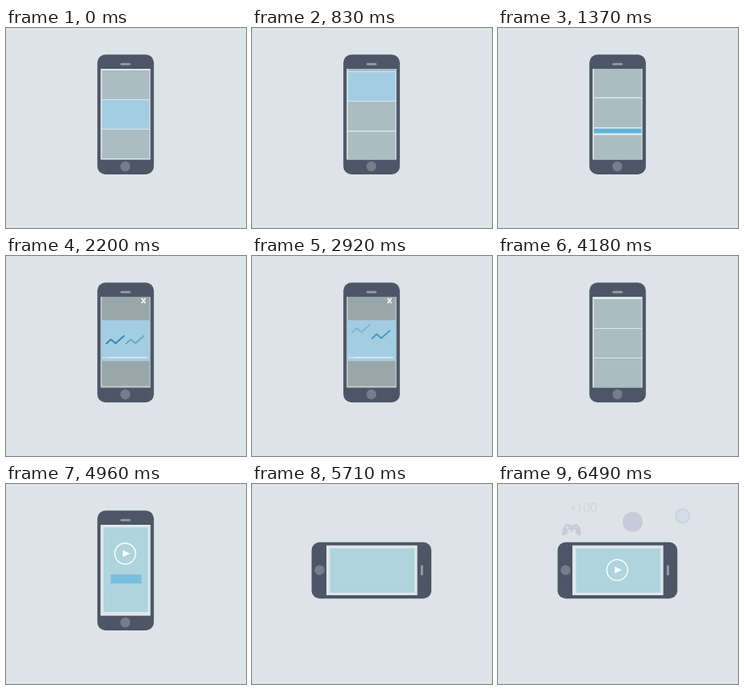
An HTML page with a canvas that plays this animation: 300 by 250 pixels, repeating every 8 s.

```html
<!DOCTYPE html>
<html lang="en">
<head>
<meta charset="utf-8">
<title>Phone formats</title>
<style>
html, body { margin: 0; width: 100%; height: 100%; overflow: hidden; background: #dce4e8; }
canvas { display: block; width: 300px; height: 250px; }
</style>
</head>
<body>
<canvas id="stage" width="300" height="250"></canvas>
<script>
const LOOP = 8000;
const ctx = document.getElementById('stage').getContext('2d');
const C = {
  bg: '#dce4e8', body: '#4d5666', knob: '#777d8a', speaker: '#979ca6',
  screen: '#dfe7ea', row: '#abbcc2', blue: '#a5cde2', strip: '#62b3d2',
  chart: '#2c8bb5', dim: 'rgba(90,90,85,.22)', ad: '#aed4dd',
  button: '#7abfde', icon: '#c5cbd8'
};
const SCREEN = { x: 118.3, y: 51, w: 62.2, h: 113.5 };
const MID = { x: 149.5, y: 108 };

const lerp = (a, b, k) => a + (b - a) * k;
const span = (t, a, b) => Math.min(1, Math.max(0, (t - a) / (b - a)));
const inOut = k => k < .5 ? 4 * k ** 3 : 1 - 4 * (1 - k) ** 3;
const out = k => 1 - (1 - k) ** 3;
const back = k => 1 + 2.4 * (k - 1) ** 3 + 1.4 * (k - 1) ** 2;

function rect(x, y, w, h, color) {
  ctx.fillStyle = color;
  ctx.fillRect(x, y, w, h);
}

function round(x, y, w, h, r, color) {
  ctx.fillStyle = color;
  ctx.beginPath();
  ctx.roundRect(x, y, w, h, r);
  ctx.fill();
}

function disc(x, y, r, color) {
  ctx.fillStyle = color;
  ctx.beginPath();
  ctx.arc(x, y, r, 0, 7);
  ctx.fill();
}

function line(points, color, width) {
  ctx.beginPath();
  points.forEach(([x, y]) => ctx.lineTo(x, y));
  ctx.strokeStyle = color;
  ctx.lineWidth = width;
  ctx.stroke();
}

// Runs a drawing scaled about a point.
function scaled(x, y, k, draw) {
  if (k <= 0) return;
  ctx.save();
  ctx.translate(x, y);
  ctx.scale(k, k);
  ctx.translate(-x, -y);
  draw();
  ctx.restore();
}

function feed(t) {
  const shift = 114 * (inOut(span(t, 500, 1280)) + inOut(span(t, 3580, 4270)));
  const gap = t < 1470 ? 7.5 * out(span(t, 1290, 1370)) : 7.5 * (1 - span(t, 1470, 1700));
  const tops = [53, 90, 127, 164.5, 202, 240.5, 281, 318, 355];
  tops.forEach((top, i) => {
    const y = top - shift + (i > 4 ? gap : 0);
    if (y < 165 && y > 14) rect(120, y, 59.3, 36, i === 1 ? C.blue : C.row);
  });
  if (gap > 1 && t < 1470) rect(120, 125.7, 59.3, gap - 1.7, C.strip);
}

function chart(x, t, start) {
  const leave = span(t, start + 390, start + 950);
  const hop = leave < .35 ? 6 * Math.sin(leave / .35 * Math.PI / 2)
    : lerp(6, -15, inOut((leave - .35) / .65));
  ctx.globalAlpha = span(t, start, start + 110) * (1 - span(leave, .6, 1));
  line([[x, 110], [x + 6, 104.3], [x + 12, 109.3], [x + 23, 99.5]].map(([a, b]) => [a, b + hop]), C.chart, 2);
  ctx.globalAlpha = 1;
}

function overlay(t) {
  if (t < 1470 || t > 3720) return;
  const open = inOut(span(t, 1470, 1800));
  scaled(149.2, 123, 1 - .65 * span(t, 3480, 3610) - .35 * span(t, 3610, 3710), () => {
    ctx.globalAlpha = open;
    rect(SCREEN.x, SCREEN.y, SCREEN.w, SCREEN.h, C.dim);
    ctx.globalAlpha = 1;
    const top = lerp(125.7, 80.3, open);
    rect(119, top, 61, 131.3 - top, C.blue);
    if (open < 1) {
      ctx.globalAlpha = 1 - open;
      rect(119, top, 61, 131.3 - top, C.strip);
    }
    ctx.globalAlpha = span(t, 1740, 1870);
    line([[169.5, 52.7], [174.3, 59]], '#fff', 1.5);
    line([[174.3, 52.7], [169.5, 59]], '#fff', 1.5);
    disc(122, 127, 1, '#e0f0f7');
    disc(125.2, 127, 1.1, '#e0f0f7');
    line([[127.5, 127], [176.5, 127]], '#e0f0f7', 1.7);
    chart(125, t, 2050);
    chart(149.7, t, 2140);
  });
}

function play(x, y, k) {
  scaled(x, y, k, () => {
    ctx.strokeStyle = '#fff';
    ctx.lineWidth = 1.4;
    ctx.beginPath();
    ctx.arc(x, y, 13, 0, 7);
    ctx.stroke();
    ctx.fillStyle = '#fff';
    ctx.beginPath();
    ctx.moveTo(x - 3, y - 4.3);
    ctx.lineTo(x + 6, y);
    ctx.lineTo(x - 3, y + 4.3);
    ctx.fill();
  });
}

function fullAd(t) {
  if (t < 4300) return;
  scaled(149.5, 107.5, out(span(t, 4300, 4640)), () => {
    rect(SCREEN.x, SCREEN.y, SCREEN.w, SCREEN.h, C.screen);
    rect(122, 54.3, 55.3, 105.7, C.ad);
  });
  const leave = 1 - span(t, 5170, 5410);
  play(149, 87, back(span(t, 4580, 4820)) * leave);
  scaled(150, 118.5, back(span(t, 4720, 4950)) * leave, () => rect(130.8, 113, 38.6, 11.3, C.button));
}

function phone(t) {
  ctx.save();
  ctx.translate(MID.x, MID.y);
  ctx.rotate(inOut(span(t, 5170, 5700)) * Math.PI / 2);
  ctx.translate(-MID.x, -MID.y);
  round(114.2, 33.3, 70.6, 149.7, 10, C.body);
  round(143, 43.7, 12.8, 2.9, 1.4, C.speaker);
  disc(149.2, 173, 6.2, C.knob);
  rect(SCREEN.x, SCREEN.y, SCREEN.w, SCREEN.h, C.screen);
  ctx.beginPath();
  ctx.rect(SCREEN.x, SCREEN.y, SCREEN.w, SCREEN.h);
  ctx.clip();
  feed(t);
  overlay(t);
  fullAd(t);
  ctx.restore();
}

function gamepad() {
  ctx.fillStyle = C.icon;
  ctx.beginPath();
  ctx.moveTo(85, 50.5);
  ctx.quadraticCurveTo(88, 49.3, 90, 51.5);
  ctx.lineTo(94, 51.5);
  ctx.quadraticCurveTo(96, 49.3, 99, 50.5);
  ctx.bezierCurveTo(102, 52, 104.5, 60, 103.7, 63);
  ctx.bezierCurveTo(102.5, 66, 98.5, 63, 96.5, 59.8);
  ctx.lineTo(87.5, 59.8);
  ctx.bezierCurveTo(85.5, 63, 81.5, 66, 80.3, 63);
  ctx.bezierCurveTo(79.5, 60, 82, 52, 85, 50.5);
  ctx.fill();
  disc(89, 58.5, 2, C.bg);
  disc(95, 58.5, 2, C.bg);
  rect(84.5, 54, 4, 1, C.bg);
  rect(86, 52.5, 1, 4, C.bg);
  disc(97.5, 54.5, 1, C.bg);
}

function score() {
  ctx.fillStyle = C.icon;
  ctx.font = '300 15px "Open Sans", sans-serif';
  ctx.fillText('+100', 89.5, 35.3);
}

function coin() {
  disc(230.8, 40, 10, '#ccd5e3');
  disc(230.8, 40, 7, '#d3dde7');
}

// Icons rise and fade in one after another.
const rewards = [
  [92, 58, gamepad],
  [168.3, 47.3, () => disc(168.3, 47.3, 12.5, C.icon)],
  [107, 30, score],
  [230.8, 40, coin]
];

function draw(t) {
  rect(0, 0, 300, 250, C.bg);
  rewards.forEach(([x, y, icon], i) => {
    const k = span(t, 6040 + i * 60, 6310 + i * 60);
    if (!k) return;
    ctx.save();
    ctx.globalAlpha = k;
    ctx.translate(0, 14 * (1 - out(k)));
    scaled(x, y, lerp(.3, 1, out(k)), icon);
    ctx.restore();
  });
  phone(t);
  play(149, 107.5, back(span(t, 5980, 6250)));
}

const began = performance.now();
function tick() {
  draw((performance.now() - began) % LOOP);
  requestAnimationFrame(tick);
}
tick();
</script>
</body>
</html>
```
